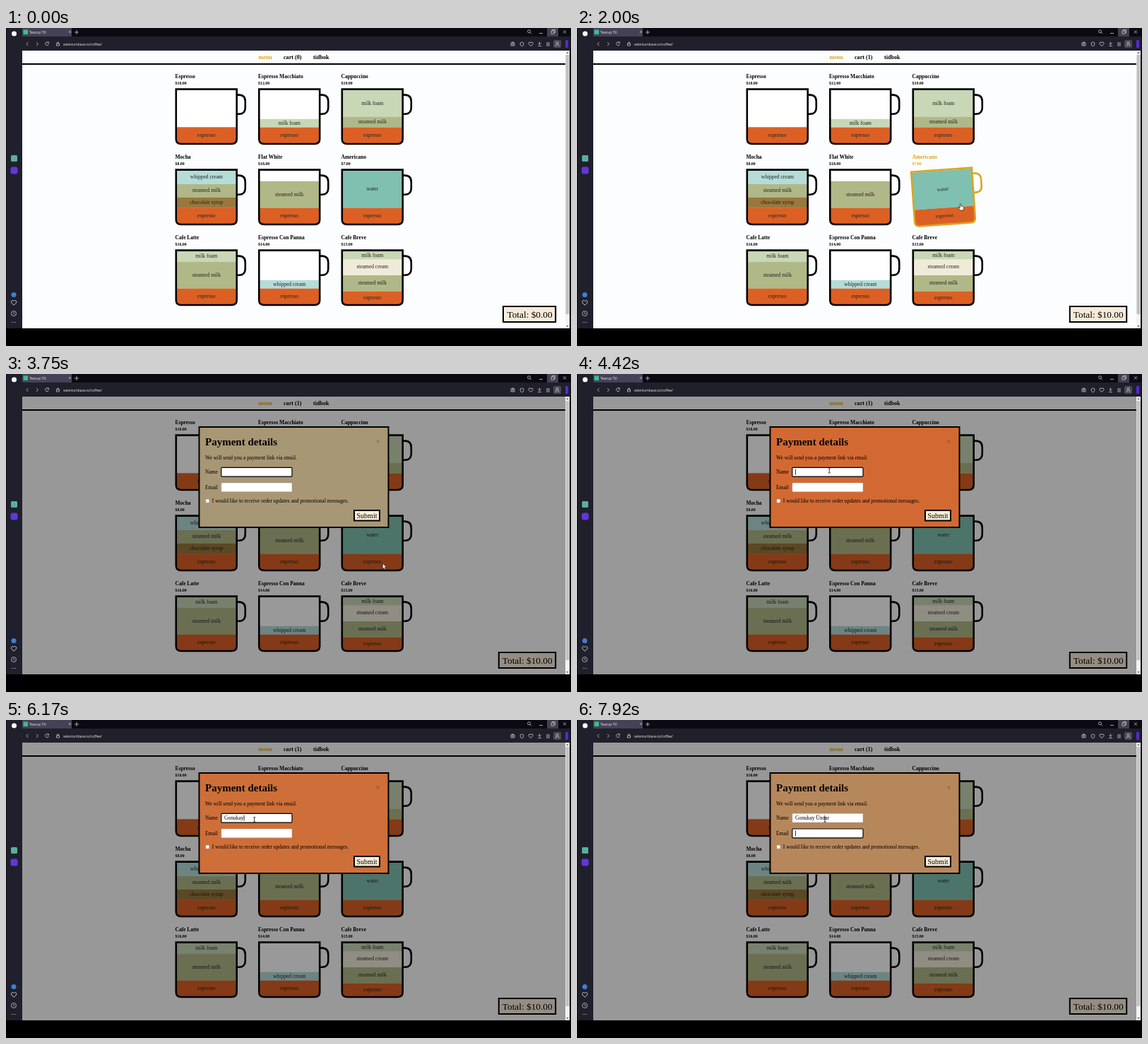
Write an HTML page that moves like this. It is 800 by 450 pixels and loops after 8000 ms.

```html
<!DOCTYPE html>
<html lang="en">
<head>
<meta charset="utf-8">
<title>Coffee ordering</title>
<style>
  html, body { margin: 0; width: 100%; height: 100%; overflow: hidden; background: #000; }
  svg { display: block; width: 800px; height: 450px; }
  text { font-family: "Liberation Serif", serif; font-size: 7.5px; white-space: pre; }
  .bold { font-weight: bold; }
  .ui text { font-family: "Open Sans", sans-serif; font-size: 4.9px; fill: #eee; }
  .icon { fill: none; stroke: #c9c8d2; stroke-width: .8; }
  .cup { fill: none; stroke: #000; stroke-width: 2.6; }
  .hover .cup { stroke: #daa520; }
  .hover .label { fill: #daa520; }
</style>
</head>
<body>
<svg viewBox="0 0 800 450">
  <defs>
    <clipPath id="inside"><path d="M1 1H87.5V72Q87.5 79 80 79H8.500Q1 79 1 72Z"/></clipPath>
  </defs>

  <g class="ui">
    <rect width="800" height="425" fill="#0b0a12"/>
    <rect x="1" width="22" height="425" fill="#20202c"/>
    <rect x="23" y="12" width="776" height="20" fill="#20202b"/>
    <rect x="23" width="70" height="12" fill="#454257"/>
    <rect x="766" width="16" height="12" fill="#42414e"/>
    <rect x="775" y="17" width="11" height="11" rx="2" fill="#4a4956"/>
    <rect x="792" y="17" width="4" height="11" rx="1" fill="#5428d8"/>
    <rect x="24.500" y="2.500" width="6.500" height="6.500" fill="#35c08a"/>
    <circle cx="11.500" cy="8" r="3.500" fill="#fff"/>
    <rect x="7" y="180" width="9" height="9" rx="1.500" fill="#58b09a"/>
    <rect x="6.500" y="196.500" width="10" height="10" rx="3" fill="#6136dc"/>
    <circle cx="11" cy="377.500" r="3.500" fill="#3f7fd0"/>
    <text x="33" y="7.800">Teacup Till</text>
    <text x="81" y="24.500">seleniumbase.io/coffee/</text>
    <g class="icon">
      <path d="M89 4l3 3m0-3l-3 3M97 6h6m-3-3v6M31.500 20l-2.500 2.500 2.500 2.500M43 20l2.500 2.500-2.500 2.500M60 20.500a2.500 2.500 0 1 0 .5 2.500m0-3.500v1.800h-2"/>
      <path d="M71.500 22h4v3h-4zM72.500 22v-1.200a1 1 0 0 1 2 0V22"/>
      <circle cx="740.500" cy="4.800" r="2"/><path d="M742 6.300l2 2M755 7.500h5M772 4h4v4h-4zM773.500 4V2.500H777.500V6.500H776M789 3.500l4 4m0-4l-4 4"/>
      <path d="M715 21h5v4h-5zM716.500 21v-1h2v1M730.500 20l2.300 1v2q0 2-2.300 3-2.300-1-2.300-3v-2zM755.500 19.500v4m-2-2l2 2 2-2M753 25.500h5M765 21h5m-5 2h5m-5 2h5"/>
      <circle cx="717.500" cy="23" r=".8"/><circle cx="780.500" cy="21" r="1.500"/><path d="M778 26q0-3 2.500-3t2.500 3"/>
      <path id="heart" d="M743 25.500q-5-3.500-2-5.500 1.300-.4 2 1 .7-1.400 2-1 3 2-2 5.500z"/>
      <use href="#heart" transform="translate(-880.500 361.500) scale(1.2)" x="0" y="0"/>
      <circle cx="11" cy="404" r="3.500"/><path d="M11 402v2l1.500 1M8 416.500h1.200m1.200 0h1.200m1.200 0h1.200"/>
    </g>
  </g>

  <rect x="23" y="32" width="769" height="393" fill="#fcfdfe"/>
  <rect x="792" y="32" width="6" height="393" fill="#f3f3f5"/>
  <rect x="792.500" y="38" width="5" height="367" fill="#c1c2c5"/>
  <path d="M793.300 36l1.700-2 1.700 2zM793.300 421l1.700 2 1.700-2z" fill="#555"/>
  <g class="bold">
    <text x="357.500" y="44" style="font-size:8.100px" fill="#daa520">menu</text>
    <text id="cart" x="393" y="44" style="font-size:8.100px"></text>
    <text x="435" y="44" style="font-size:8.100px">tidbok</text>
  </g>
  <rect x="23" y="50" width="769" height="2"/>
  <g id="menu"></g>
  <rect id="totalBox" y="394" height="22" fill="#f7ead9" stroke="#000" stroke-width="2"/>
  <text id="total" x="773.700" y="409.500" text-anchor="end" style="font-size:13.330px"></text>

  <g id="modal">
    <rect x="23" y="32" width="769" height="393" opacity=".4"/>
    <rect id="panel" x="273.500" y="75" width="268" height="142" stroke="#000" stroke-width="2"/>
    <text x="282" y="101" class="bold" style="font-size:15px">Payment details</text>
    <text x="523.500" y="99" style="font-size:11px" fill="#000" opacity=".4">×</text>
    <text x="282" y="121.300">We will send you a payment link via email.</text>
    <text x="282" y="141.200">Name</text>
    <text x="282" y="163">Email</text>
    <rect id="nameField" x="304.800" y="132.300" width="100.200" height="12.800" rx="1" fill="#fff"/>
    <rect id="emailField" x="304.800" y="154" width="100.200" height="12.800" rx="1" fill="#fff"/>
    <text id="name" x="309" y="141.200"></text>
    <rect id="caret" width=".8" height="8"/>
    <rect x="282.700" y="177" width="5.200" height="5.200" rx=".8" fill="#fff" stroke="#777" stroke-width=".5"/>
    <text x="291.800" y="182.300">I would like to receive order updates and promotional messages.</text>
    <rect x="493" y="193" width="36" height="14.500" fill="#f9eed8" stroke="#000" stroke-width="2"/>
    <text x="511" y="203.700" text-anchor="middle" style="font-size:10px">Submit</text>
  </g>

  <g id="pointer" stroke="#000" stroke-width=".6" fill="#fff">
    <path id="arrow" d="M0 0V8l1.900-1.700 1.200 2.700 1.300-.6L3.200 5.700H5.700z"/>
    <path id="hand" d="M-.8 0q.8-1 1.600 0v3l3.200.8q1 .4.800 1.600L4 9H-.5L-3 5.500q0-1.200 1-.8l1.200 1z"/>
    <path id="beam" d="M-1.500-3.500Q0-3.500 0-2.800 0-3.500 1.500-3.500M0-3V3M-1.500 3.500Q0 3.500 0 2.800 0 3.500 1.500 3.500" fill="none" stroke-width=".8"/>
  </g>
</svg>

<script>
const LOOP = 8000, FPS = 12;
const ORDERED = 1080, OPENED = 3160, TYPING = 4980, KEY_GAP = 175, TABBED = 7580;
const CUSTOMER = 'Gonukay Ündar';
const TEAL = [129, 193, 176], ORANGE = [220, 96, 36];

const colors = {
  'espresso': '#dc6024', 'milk foam': '#c8d7b5', 'steamed milk': '#b0b888',
  'whipped cream': '#b4dcd8', 'chocolate syrup': '#98783e', 'water': '#80c0b1',
  'steamed cream': '#f0ead9'
};

// Name, price, then layers from the bottom: ingredient, height
const drinks = [
  ['Espresso', 10, 'espresso', 23],
  ['Espresso Macchiato', 12, 'espresso', 23, 'milk foam', 11.5],
  ['Cappuccino', 19, 'espresso', 23, 'steamed milk', 15, 'milk foam', 37.5],
  ['Mocha', 8, 'espresso', 23, 'chocolate syrup', 15, 'steamed milk', 18.7, 'whipped cream', 18.8],
  ['Flat White', 18, 'espresso', 23, 'steamed milk', 37.5],
  ['Americano', 7, 'espresso', 23, 'water', 52.5],
  ['Cafe Latte', 16, 'espresso', 23, 'steamed milk', 37.5, 'milk foam', 15],
  ['Espresso Con Panna', 14, 'espresso', 23, 'whipped cream', 11.5],
  ['Cafe Breve', 15, 'espresso', 19, 'steamed milk', 22.7, 'steamed cream', 22.6, 'milk foam', 11.2]
];

// Pointer path: time, x, y
const path = [
  [0, 170, 470], [900, 285, 128], [1200, 285, 128], [2000, 543, 249],
  [2750, 708.5, 400], [3250, 708.5, 400], [4250, 358, 136], [5000, 352, 141], [8000, 351, 141]
];

const $ = id => document.getElementById(id);
const set = (id, attrs) => { for (const k in attrs) $(id).setAttribute(k, attrs[k]); };
const show = (id, on) => { $(id).style.display = on ? '' : 'none'; };

function drinkMarkup([name, price, ...layers], i) {
  const x = 239.5 + i % 3 * 117.5, y = 85.3 + Math.floor(i / 3) * 114;
  let bottom = 78, fills = '', labels = '';
  for (let k = 0; k < layers.length; k += 2) {
    const h = layers[k + 1];
    bottom -= h;
    fills += `<rect y="${bottom}" width="89" height="${h + .3}" fill="${colors[layers[k]]}"/>`;
    labels += `<text x="44.3" y="${bottom + h / 2 + 2.2}" text-anchor="middle" fill="#222">${layers[k]}</text>`;
  }
  return `<g transform="translate(${x} ${y})">
    <text class="bold label" y="-14.3">${name}</text>
    <text class="bold label" y="-5.3" style="font-size:5.9px">$${price}.00</text>
    <g class="body">
      <g clip-path="url(#inside)"><rect width="89" height="80" fill="#fff"/>${fills}</g>${labels}
      <path class="cup" d="M1.300 1.300H87.200V72Q87.200 78.700 80 78.700H8.500Q1.300 78.700 1.300 72Z"/>
      <path class="cup" stroke-width="3.200" d="M87.500 9.300H90Q99.300 9.300 99.300 18.500V27.500Q99.300 36.500 90 36.500H87.500"/>
    </g></g>`;
}
$('menu').innerHTML = drinks.map(drinkMarkup).join('');
const cups = [...$('menu').children].map((group, i) => ({
  group, body: group.querySelector('.body'),
  x: 239.5 + i % 3 * 117.5, y: 85.3 + Math.floor(i / 3) * 114
}));

function pointerAt(t) {
  const i = Math.max(1, path.findIndex(p => p[0] > t));
  const [t0, x0, y0] = path[i - 1], [t1, x1, y1] = path[i];
  const u = (t - t0) / (t1 - t0), e = u * u * (3 - 2 * u);
  return [x0 + (x1 - x0) * e, y0 + (y1 - y0) * e];
}

function draw(t) {
  const open = t >= OPENED, ordered = t >= ORDERED;
  const [px, py] = pointerAt(t);
  const within = (x, y, w, h) => px > x && px < x + w && py > y && py < y + h;

  let clickable = within(697, 393, 82, 24);
  for (const cup of cups) {
    const hover = !open && within(cup.x, cup.y, 88.5, 80);
    clickable ||= hover;
    cup.group.setAttribute('class', hover ? 'hover' : '');
    cup.body.setAttribute('transform', hover ? 'rotate(-4 45 40)' : '');
  }

  $('cart').textContent = `cart (${ordered ? 1 : 0})`;
  $('total').textContent = `Total: $${ordered ? 10 : 0}.00`;
  set('totalBox', ordered ? { x: 697.8, width: 80.4 } : { x: 704, width: 74.2 });

  show('modal', open);
  if (open) {
    const phase = (t - 3320 + 2000) % 2000 / 1000, mix = 1 - Math.abs(1 - phase);
    set('panel', { fill: `rgb(${TEAL.map((c, i) => Math.round(c + (ORANGE[i] - c) * mix))})` });

    const typed = Math.min(CUSTOMER.length, Math.max(0, Math.floor((t - TYPING) / KEY_GAP) + 1));
    const onEmail = t >= TABBED;
    $('name').textContent = CUSTOMER.slice(0, typed);
    const focus = { stroke: '#000', 'stroke-width': 1.2 }, blur = { stroke: '#999', 'stroke-width': .5 };
    set('nameField', onEmail ? blur : focus);
    set('emailField', onEmail ? focus : blur);

    const lastKey = onEmail ? TABBED : typed ? TYPING + (typed - 1) * KEY_GAP : OPENED;
    const textWidth = onEmail || !typed ? 0 : $('name').getComputedTextLength();
    set('caret', { x: 309.2 + textWidth, y: onEmail ? 156.4 : 134.6 });
    show('caret', (t - lastKey) % 1000 < 500);
  }

  const onField = within(304, 132, 101, 13) || within(304, 154, 101, 13);
  const kind = open ? (onField ? 'beam' : 'arrow') : clickable ? 'hand' : 'arrow';
  for (const id of ['arrow', 'hand', 'beam']) show(id, id === kind);
  set('pointer', { transform: `translate(${px} ${py})` });
}

function tick() {
  const t = performance.now() % LOOP;
  draw(Math.floor(t * FPS / 1000 + .01) * 1000 / FPS % LOOP);
  requestAnimationFrame(tick);
}
tick();
</script>
</body>
</html>
```
